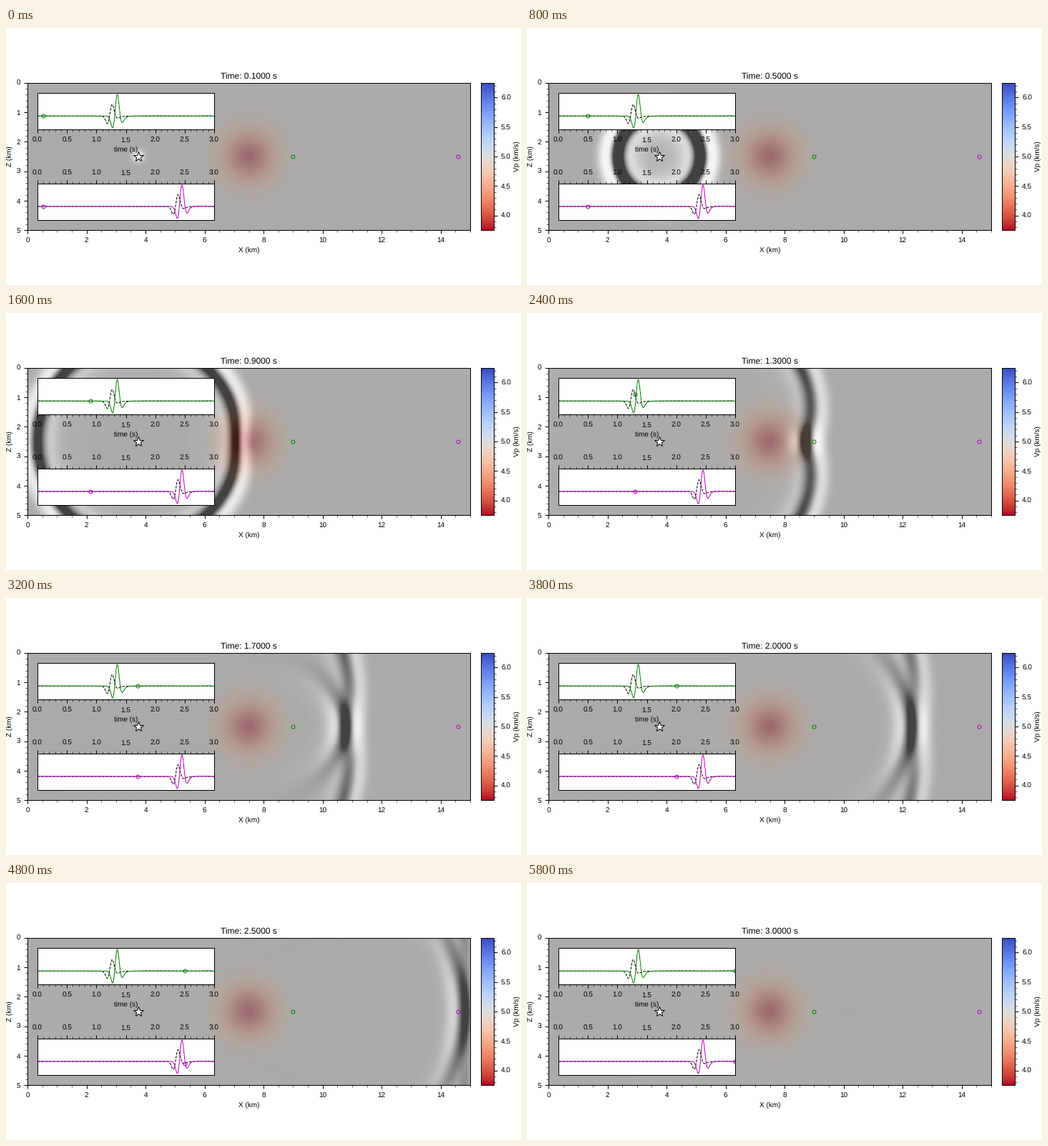
Write a matplotlib script that moves like this. It is 720 px wide and 360 px high and loops after 6000 ms.

```python
import numpy as np
import matplotlib.pyplot as plt
from matplotlib.animation import FuncAnimation
from matplotlib.ticker import AutoMinorLocator, MultipleLocator

W, H = 720, 360
FRAMES, STEP = 30, 0.1

plt.rcParams.update({
    "font.family": "Liberation Sans", "font.size": 10, "axes.titlesize": 12,
    "text.hinting": "none",
    "xtick.major.size": 5, "ytick.major.size": 5,
    "xtick.minor.size": 3, "ytick.minor.size": 3,
    "xtick.major.pad": 5, "ytick.major.pad": 5,
    "axes.linewidth": 1, "xtick.major.width": 1, "ytick.major.width": 1,
})

# Model grid in km, with an absorbing sponge around it
H_GRID, DT, PAD = 0.05, 0.004, 80
LX, LZ, V0 = 15.0, 5.0, 5.0
NX, NZ = round(LX / H_GRID) + 1, round(LZ / H_GRID) + 1
SRC = (3.75, 2.5)
RECEIVERS = [((9.0, 2.5), "g"), ((14.6, 2.5), "m")]
PER_FRAME = round(STEP / DT)
STENCIL = (-49 / 18, 3 / 2, -3 / 20, 1 / 90)

x = (np.arange(NX + 2 * PAD) - PAD) * H_GRID
z = (np.arange(NZ + 2 * PAD) - PAD) * H_GRID
X, Z = np.meshgrid(x, z)
inner = np.s_[PAD:-PAD, PAD:-PAD]
blob = np.exp(-((X - 7.5) ** 2 + (Z - 2.5) ** 2) / (2 * 0.64 ** 2))
slow = V0 * (1 - 0.25 * blob)


def node(point):
    return PAD + round(point[1] / H_GRID), PAD + round(point[0] / H_GRID)


def ricker(t, f=5.0):
    a = (np.pi * f * (t - 1 / f)) ** 2
    return (1 - 2 * a) * np.exp(-a)


def sponge():
    def ramp(v, size):
        return np.maximum(0, np.maximum(-v, v - size)) / (PAD * H_GRID)
    return 12 * DT * (ramp(X, LX) ** 3 + ramp(Z, LZ) ** 3)


def propagate(vp):
    """Return the snapshots and receiver traces of the acoustic wave."""
    c2 = ((vp * DT / H_GRID) ** 2).astype(np.float32)[3:-3, 3:-3]
    damp = sponge().astype(np.float32)[3:-3, 3:-3]
    keep, gain = 1 - damp, 1 / (1 + damp)
    u, prev = np.zeros((2, *vp.shape), np.float32)
    rows, cols = vp.shape
    mid = np.s_[3:-3, 3:-3]
    snaps, traces = [], [[0.0] * len(RECEIVERS)]
    for n in range(FRAMES * PER_FRAME):
        lap = 2 * STENCIL[0] * u[mid]
        for k in (1, 2, 3):
            lap += STENCIL[k] * (
                u[3 + k:rows - 3 + k, 3:-3] + u[3 - k:rows - 3 - k, 3:-3]
                + u[3:-3, 3 + k:cols - 3 + k] + u[3:-3, 3 - k:cols - 3 - k])
        prev[mid] = (2 * u[mid] - keep * prev[mid] + c2 * lap) * gain
        prev[node(SRC)] += ricker(n * DT)
        u, prev = prev, u
        traces.append([u[node(p)] for p, _ in RECEIVERS])
        if (n + 1) % PER_FRAME == 0:
            snaps.append(u[inner].copy())
    return snaps, np.array(traces).T


snaps, traces = propagate(slow)
_, plain = propagate(np.full_like(slow, V0))
clip = plain[0].max() / 1.05
times = np.arange(FRAMES * PER_FRAME + 1) * DT

fig = plt.figure(figsize=(W / 72, H / 72), dpi=72, facecolor="white")


def add_axes(left, top, width, height):
    return fig.add_axes([left / W, 1 - (top + height) / H, width / W, height / H])


ax = add_axes(30, 76.75, 619, 206.5)
half = H_GRID / 2
grid = dict(extent=(-half, LX + half, LZ + half, -half), aspect="auto",
            interpolation="bilinear")
model = ax.imshow(slow[inner], cmap="coolwarm_r", vmin=3.75, vmax=6.25, **grid)
wave = ax.imshow(snaps[0], cmap="Greys", vmin=-clip, vmax=clip, alpha=0.7, **grid)
ax.set(xlim=(0, LX), ylim=(LZ, 0), xlabel="X (km)", ylabel="Z (km)")
ax.xaxis.set_minor_locator(AutoMinorLocator(4))
ax.yaxis.set_minor_locator(AutoMinorLocator(5))
ax.yaxis.set_major_locator(MultipleLocator(1))
title = ax.set_title("")
ax.plot(*SRC, "*", ms=15, mfc="white", mec="black", mew=1)

cax = add_axes(664, 76.75, 18, 206.5)
bar = fig.colorbar(model, cax=cax, label="Vp (km/s)")
bar.outline.set_linewidth(1)
cax.yaxis.set_major_locator(MultipleLocator(0.5))
cax.yaxis.set_minor_locator(AutoMinorLocator(5))


def ring(axes, px, py, color):
    return axes.plot([px], [py], "o", ms=5, mfc="none", mec=color, mew=1)[0]


dots = []
for i, (point, color) in enumerate(RECEIVERS):
    ring(ax, *point, color)
    box = add_axes(44, (90.75, 217.6)[i], 247, 51.6)
    box.plot(times, plain[i], "k--", lw=1)
    box.plot(times, traces[i], color=color, lw=1)
    box.set(xlim=(0, 3), yticks=[])
    box.set_ylim(box.get_ylim())
    box.xaxis.set_major_locator(MultipleLocator(0.5))
    box.xaxis.set_minor_locator(AutoMinorLocator(5))
    if i == 0:
        box.set_xlabel("time (s)")
    else:
        box.xaxis.tick_top()
    dots.append(ring(box, 0, 0, color))


def update(i):
    t = (i + 1) * STEP
    wave.set_data(snaps[i])
    title.set_text(f"Time: {t:.4f} s")
    for dot, trace in zip(dots, plain):
        dot.set_data([t], [trace[(i + 1) * PER_FRAME]])
    return [wave, title, *dots]


anim = FuncAnimation(fig, update, frames=FRAMES, interval=200, repeat=True)
plt.show()
```
